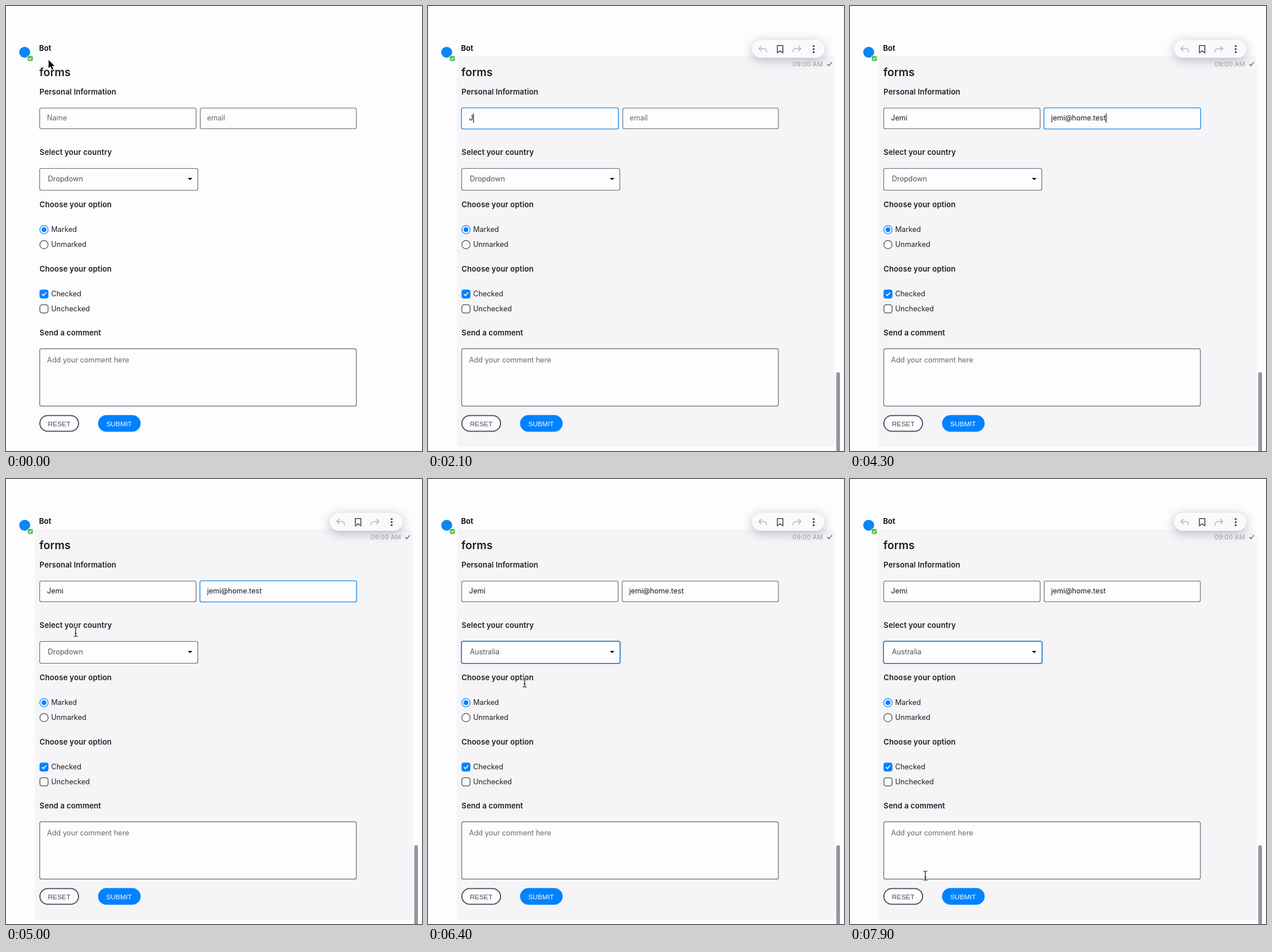
These frames come from a looping animation (723x774 px, 8000 ms). An HTML page with a canvas:

```html
<!DOCTYPE html>
<html lang="en">
<head>
<meta charset="utf-8">
<title>Bot form</title>
<style>
  html, body { margin: 0; height: 100%; overflow: hidden; background: #fdfcfe; }
  canvas { display: block; }
</style>
</head>
<body>
<canvas id="stage" width="723" height="774"></canvas>
<script>
const ctx = document.getElementById('stage').getContext('2d');
const LOOP = 8000, STEP = 100;
const PAGE = '#fdfcfe', INK = '#1f1f24', MUTED = '#525359', HINT = '#68696f', EDGE = '#65676e', DARK = '#484a52';
const BLUE = '#0082ff', FOCUS = '#1a8ae6', SELECTED = '#1168bd', BAR = '#9594a1';
const NAME = 'Jemi', EMAIL = 'jemi@home.test';

// time, x, y, shape
const pointerPath = [
  [0, 74, 94, 'arrow'], [100, 74, 94, 'arrow'], [300, 89, 160, 'arrow'], [400, 99, 196, 'beam'],
  [1900, 0, 0, ''], [4800, 103, 208, 'beam'], [5000, 121, 266, 'beam'], [5100, 134, 288, 'hand'],
  [5400, 158, 313, 'hand'], [5600, 158, 313, 'hand'], [6100, 166, 346, 'hand'],
  [6300, 168, 354, 'beam'], [6600, 168, 354, 'beam'], [7000, 140, 470, 'beam'],
  [7500, 116, 661, 'beam'], [7900, 131, 690, 'beam']
];

function text(str, x, y, { size = 12.5, weight = 400, color = INK, family = 'Inter', align = 'left', spacing = 0 } = {}) {
  ctx.font = `${weight} ${size}px ${family}, sans-serif`;
  ctx.letterSpacing = `${spacing}px`;
  ctx.textAlign = align;
  ctx.fillStyle = color;
  ctx.fillText(str, x, y);
}
const heading = (str, y) => text(str, 58.3, y, { size: 13, weight: 600, spacing: .12 });

function paint(fill, stroke, width = 1.1) {
  if (fill) { ctx.fillStyle = fill; ctx.fill(); }
  if (stroke) { ctx.strokeStyle = stroke; ctx.lineWidth = width; ctx.stroke(); }
}

// Rounded box given by its outer edges
function box(x1, y1, x2, y2, radius, fill, stroke, width = 1.1) {
  const inset = stroke ? width / 2 : 0;
  ctx.beginPath();
  ctx.roundRect(x1 + inset, y1 + inset, x2 - x1 - 2 * inset, y2 - y1 - 2 * inset, radius);
  paint(fill, stroke, width);
}

// Form control whose focus ring grows slightly past its edges
function control(x1, y1, x2, y2, ring, width) {
  const grow = ring ? .6 : 0;
  box(x1 - grow, y1 - grow, x2 + grow, y2 + grow, 3, PAGE, ring || EDGE, ring ? width : 1.1);
}

function circle(x, y, r, fill, stroke, width) {
  ctx.beginPath();
  ctx.arc(x, y, r, 0, 7);
  paint(fill, stroke, width);
}

function path(x, y, d, fill, stroke, width) {
  ctx.save();
  ctx.translate(x, y);
  const shape = new Path2D(d);
  if (stroke) { ctx.strokeStyle = stroke; ctx.lineWidth = width; ctx.stroke(shape); }
  if (fill) { ctx.fillStyle = fill; ctx.fill(shape); }
  ctx.restore();
}

function shadow(blur, dy, alpha, draw) {
  ctx.save();
  ctx.shadowColor = `rgba(40,40,60,${alpha})`;
  ctx.shadowBlur = blur;
  ctx.shadowOffsetY = dy;
  draw();
  ctx.restore();
}

function caret(x, y) {
  ctx.fillStyle = '#111';
  ctx.fillRect(x, y - 8, 1.2, 16);
}

function toolbar(dy) {
  shadow(18, 4, .3, () => box(563, 59 + dy, 689, 90 + dy, 15.5, '#fafafc'));
  const reply = 'M-2.5 -5.5L-7 -1L-2.5 3.5M-7 -1H1C5 -1 6.7 2 6.7 5.5';
  path(582, 75 + dy, reply, null, '#b4b4ba', 1.5);
  ctx.save();
  ctx.scale(-1, 1);
  path(-641, 75 + dy, reply, null, '#b4b4ba', 1.5);
  ctx.restore();
  path(612, 75 + dy, 'M-4.7 -6.3H4.7V6.3L0 3L-4.7 6.3Z', null, '#45464e', 1.6);
  for (const y of [-5.2, 0, 5.2]) circle(670.3, 75 + y + dy, 1.7, '#45464e');
  text('09:00 AM', 633.5, 105 + dy, { size: 11, color: '#9a9aa0', spacing: .2 });
  path(698, 101 + dy, 'M-4 0L-1.3 3L4 -3.4', null, '#55565e', 1.2);
}

function fields(t, dy) {
  const onName = t >= 1000 && t < 2800, onEmail = t >= 2800 && t < 5400;
  const letters = [1900, 2200, 2400, 2500].filter(at => t >= at).length;
  const hasEmail = t >= 3900, mid = 195 + dy;

  const drawField = (x1, x2, focused, value, hint, tx) => {
    control(x1, 177 + dy, x2, 214 + dy, focused && FOCUS, value ? 1.4 : 2);
    text(value || hint, tx, 199 + dy, { color: value ? '#17171b' : HINT });
    return tx + (value ? ctx.measureText(value).width : 1);
  };
  const nameEnd = drawField(58, 331, onName, NAME.slice(0, letters), 'Name', 71.3);
  const shift = onName ? 1 : 0;
  const emailEnd = drawField(337 + shift, 609.5, onEmail, hasEmail ? EMAIL : '', 'email', 349.5 + shift);
  if (onName && !(t >= 1600 && t < 1900) && t < 2600) caret(nameEnd, mid);
  if (t >= 2900 && t < 3400 || t >= 3900 && t < 4400) caret(emailEnd, mid);
}

function select(t, open, dy) {
  const chosen = t >= 6300;
  control(58, 282 + dy, 334, 321, open ? FOCUS : chosen && SELECTED, 1.5);
  text(chosen ? 'Australia' : 'Dropdown', open ? 73.7 : 72.7, 305 + dy, { color: MUTED });
  path(320 + dy, 301 + dy, open ? 'M-4 2L0 -2L4 2Z' : 'M-4 -2L0 2L4 -2Z', '#111');
}

function menu() {
  shadow(22, 5, .42, () => box(60, 326, 332, 464.5, 4, PAGE));
  ctx.save();
  ctx.beginPath();
  ctx.rect(60, 326, 272, 138.5);
  ctx.clip();
  ['Australia', 'Brazil', 'China', 'Denmark'].forEach((country, i) =>
    text(country, 73.7, 358.5 + i * 36.7, { color: MUTED, spacing: .08 }));
  ctx.restore();
  box(322.5, 330, 329, 379, 3, '#8f8e9b');
}

function choices() {
  circle(66, 389, 7.2, PAGE, BLUE, 1.3);
  circle(66, 389, 4.3, BLUE);
  circle(66, 415, 7.2, PAGE, DARK, 1.2);
  box(58.3, 493.3, 73.7, 508.7, 4, BLUE);
  path(66, 501, 'M-3.6 0L-1 2.8L3.8 -2.8', null, '#fff', 1.7);
  box(58.2, 519, 73.8, 534.5, 4, PAGE, DARK, 1.3);
  text('Marked', 78.5, 393);
  text('Unmarked', 78.5, 419);
  text('Checked', 78.5, 504.5);
  text('Unchecked', 78.5, 531);
}

function pointer(t) {
  const i = pointerPath.findLastIndex(p => p[0] <= t);
  const [t0, x0, y0, shape] = pointerPath[i];
  const next = pointerPath[i + 1];
  let x = x0, y = y0;
  if (next && next[3]) {
    const k = (t - t0) / (next[0] - t0);
    x += (next[1] - x0) * k;
    y += (next[2] - y0) * k;
  }
  if (shape === 'arrow') {
    path(x, y, 'M0 0V14L3.3 11L5.8 16.5L8.3 15.4L5.9 10.2H10.3Z', '#000', '#fff', 1.6);
  } else if (shape === 'beam') {
    const beam = 'M-3.5 -8Q0 -8 0 -5.5Q0 -8 3.5 -8M0 -5.5V5.5M-3.5 8Q0 8 0 5.5Q0 8 3.5 8M-1.8 2.5H1.8';
    path(x, y, beam, null, '#fff', 2.8);
    path(x, y, beam, null, '#111', 1.2);
  } else if (shape === 'hand') {
    path(x, y, 'M-1.6 9V1Q-1.6 -.6 0 -.6Q1.4 -.6 1.4 1V5Q3.8 4 4.3 5.7Q6.5 5 7 6.6Q9.4 6 9.4 8.5' +
      'V11.5Q9.4 13 8 15.8H.6Q-1 12.5 -4.2 9.8Q-5.2 8.4 -4 7.7Q-2.8 7.2 -1.6 9Z', '#fff', '#111', 2);
    path(x, y, 'M1.5 5V8.5M4.3 6V9M7 7V9.3M1.8 11V14M4.2 11V14M6.6 11V14', null, '#111', .8);
  }
}

function draw(t) {
  const open = t >= 5400 && t < 6300, dy = open ? -1 : 0;
  const hover = Math.min(1, Math.max(0, (t - 600) / 300));
  ctx.fillStyle = PAGE;
  ctx.fillRect(0, 0, 723, 774);

  ctx.globalAlpha = hover;
  box(50, 87 + dy, 707, 767, 8, '#f5f4f7');
  toolbar(dy);
  box(709.5, 637, 716, 780, 3, BAR);
  ctx.globalAlpha = 1;

  circle(32.5, 80.5, 9.5, '#0a86f5');
  box(37, 86, 47.5, 96.5, 2.5, '#52bf4b', '#fff', .8);
  path(42.2, 91.3, 'M-2.4 0L-.6 1.9L2.5 -1.8', null, '#fff', 1.2);

  text('Bot', 57.5, 77.5 + dy, { size: 13, weight: 600, color: '#000' });
  text('forms', 58, 121.5, { size: 19.2, weight: 600 });
  heading('Personal Information', 154 + dy);
  fields(t, dy);
  heading('Select your country', 259 + dy);
  select(t, open, dy);
  heading('Choose your option', 350);
  choices();
  heading('Choose your option', 461.5);
  heading('Send a comment', 573);
  box(58, 595.5, 609.5, 696.5, 3, PAGE, EDGE, 1.2);
  text('Add your comment here', 71.3, 620, { color: HINT });

  const label = { size: 11.8, family: 'Liberation Sans', align: 'center' };
  box(58, 711.5, 127, 740.5, 14.5, PAGE, DARK, 1.8);
  text('RESET', 92.5, 730.5, { ...label, color: DARK });
  box(160, 711.5, 234, 740.5, 14.5, BLUE);
  text('SUBMIT', 196.5, 730.5, { ...label, color: '#fff' });

  if (open) menu();
  pointer(t);
}

function frame() {
  const t = performance.now() % LOOP;
  draw(Math.floor(t / STEP) * STEP);
  requestAnimationFrame(frame);
}
frame();
</script>
</body>
</html>
```
